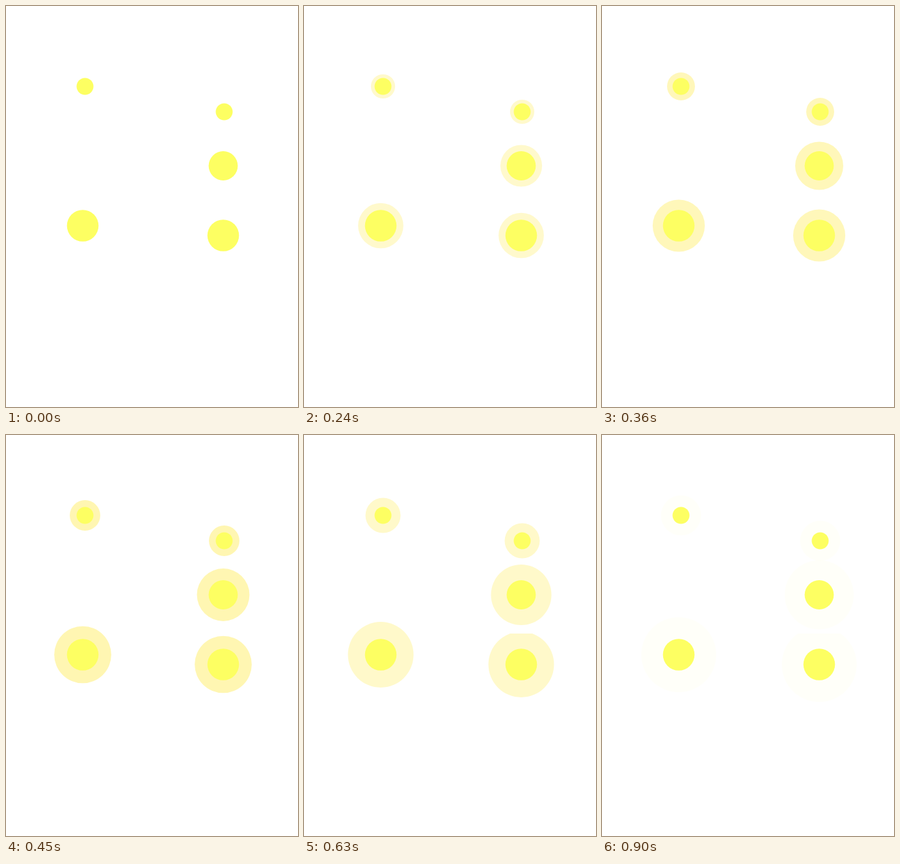
Recreate the animation shown at these times as an HTML page with a canvas. Size 449 by 616 pixels, loop 1320 ms.

```html
<!DOCTYPE html>
<html lang="en">
<head>
<meta charset="utf-8">
<title>Pulsing dots</title>
<style>
html, body { margin: 0; width: 100%; height: 100%; overflow: hidden; background: #fff; }
canvas { display: block; }
</style>
</head>
<body>
<canvas id="stage" width="449" height="616"></canvas>
<script>
const canvas = document.getElementById('stage');
const ctx = canvas.getContext('2d');
const { width, height } = canvas;

// Times in ms
const LOOP = 1320, STEP = 30, HOLD = 900, DELAY = 15;
const GROW = 1208, FADE = 505;

// clipTop: the halo is cut off above this line
const dots = [
  { x: 121.5, y: 123.5, r: 13 },
  { x: 335.5, y: 162.5, r: 13 },
  { x: 334, y: 245.5, r: 22.4 },
  { x: 118, y: 337.5, r: 24.3 },
  { x: 334, y: 352.5, r: 24.3, clipTop: 305 }
];

const easeOut = u => Math.sin(Math.min(1, u) * Math.PI / 2);

function disc(x, y, r, color) {
  ctx.fillStyle = color;
  ctx.beginPath();
  ctx.arc(x, y, r, 0, 2 * Math.PI);
  ctx.fill();
}

function drawHalo({ x, y, r, clipTop = 0 }, scale, alpha) {
  ctx.save();
  ctx.beginPath();
  ctx.rect(0, clipTop, width, height - clipTop);
  ctx.clip();
  disc(x, y, r * scale, `rgba(254, 236, 98, ${alpha})`);
  ctx.restore();
}

function draw(now) {
  const frame = Math.floor((now % LOOP) / STEP) * STEP;
  const t = Math.max(0, Math.min(HOLD, frame) - DELAY);

  // The halo grows steadily; it fades in, then out
  const scale = 1 + 1.5 * easeOut(t / GROW);
  const alpha = 0.5 * (t < FADE ? easeOut(t / FADE) : 1 - easeOut(t / FADE - 1));

  ctx.fillStyle = '#fff';
  ctx.fillRect(0, 0, width, height);
  if (t > 0) dots.forEach(dot => drawHalo(dot, scale, alpha));
  dots.forEach(({ x, y, r }) => disc(x, y, r, '#fdff62'));
}

const start = performance.now();
function tick() {
  draw(performance.now() - start);
  requestAnimationFrame(tick);
}
tick();
</script>
</body>
</html>
```
